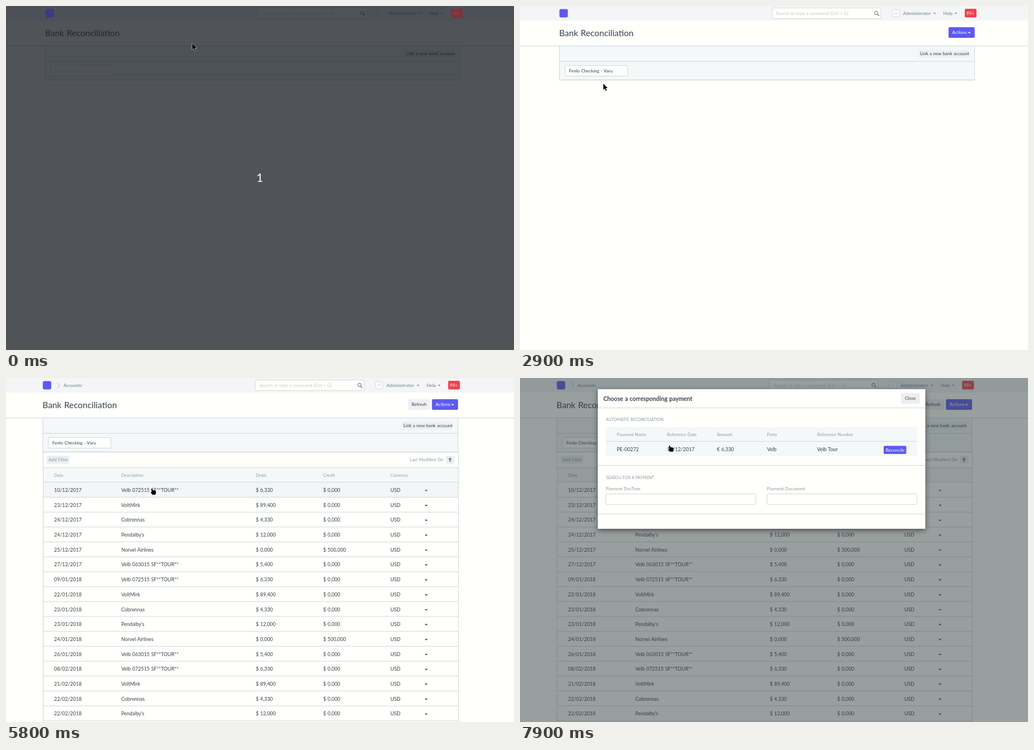
These frames come from a looping animation (908x616 px, 8000 ms). An HTML page:

```html
<!DOCTYPE html>
<html lang="en">
<head>
<meta charset="utf-8">
<title>Bank Reconciliation</title>
<style>
html, body { margin: 0; width: 100%; height: 100%; overflow: hidden; background: #fffffc; }
svg { display: block; width: 908px; height: 616px; }
text { font-family: Lato, "Noto Sans", sans-serif; word-spacing: .05em; white-space: pre; }
.shadow { filter: drop-shadow(0 2px 3px rgba(0, 0, 0, .25)); }
#modal .sheet { filter: drop-shadow(0 3px 5px rgba(0, 0, 0, .5)); }
</style>
</head>
<body>
<svg id="stage" viewBox="0 0 908 616"></svg>
<script>
const INK = '#36414c', MUTED = '#8d99a6', FAINT = '#cdd2d7', LINE = '#cfd8df';
const PAPER = '#fffffc', PANEL = '#f5f8f8', BUTTON = '#eef0f3', BLUE = '#5e5aee', RED = '#f1414e';
const LOOP = 8000, STEP = 100;

const text = (x, y, s, size = 8, fill = INK, extra = '') =>
  `<text x="${x}" y="${y}" font-size="${size}" fill="${fill}" ${extra}>${s}</text>`;
const bold = (x, y, s, size = 8, fill = MUTED) => text(x, y, s, size, fill, 'font-weight="700"');
const rect = (x, y, w, h, fill, extra = '') =>
  `<rect x="${x}" y="${y}" width="${w}" height="${h}" fill="${fill}" ${extra}/>`;
const path = (d, fill, extra = '') => `<path d="${d}" fill="${fill}" ${extra}/>`;
const line = (x, y, w, color = LINE) => rect(x, y, w, 1, color);
const side = (x, y, h) => rect(x, y, 1, h, LINE);
const field = (x, y, w, h, id = '') => rect(x, y, w, h, PAPER, `rx="2" stroke="${LINE}" ${id}`);
const caret = (x, y, fill) => path(`M${x - 2.5} ${y}h5l-2.5 2.7z`, fill);
const group = (id, body, extra = '') => `<g id="${id}" ${extra}>${body}</g>`;
const button = (x, y, w, h, label, tx, ty, fill = BUTTON, ink = INK) =>
  rect(x, y, w, h, fill, 'rx="2"') + text(tx, ty, label, 8, ink);

const ACCOUNT = 'Fenlo Checking - Varu';
const logo = rect(70.5, 5.5, 15, 15, BLUE, 'rx="3"');
const badge = rect(795, 5, 21, 15.5, RED, 'rx="2"');

const page =
  rect(0, 0, 908, 616, PAPER) + rect(0, 0, 908, 26, '#f4f5f6') + line(0, 71, 908) +
  group('shell',
    logo + field(450.5, 3.5, 194.5, 19) +
    text(457.5, 16, 'Search or type a command (Ctrl + G)', 8, '#c3c8cd') +
    '<circle cx="636.5" cy="12.3" r="3" fill="none" stroke="#55606a"/>' +
    path('M638.8 14.6l3 3', 'none', 'stroke="#55606a" stroke-width="1.3"') +
    rect(665.5, 6.5, 12.5, 13, PAPER, `rx="2" stroke="${LINE}"`) +
    text(671.8, 16, 'A', 8.5, FAINT, 'text-anchor="middle"') +
    bold(684.7, 16, 'Administrator') + caret(741, 12, MUTED) +
    bold(756.5, 16, 'Help') + caret(779, 12, MUTED) +
    badge + text(798, 16, '99+', 8, '#fff') +
    text(70, 53.7, 'Bank Reconciliation', 15.4) +
    rect(70.5, 72, 742, 60.5, PANEL) + side(70, 72, 61) + side(812, 72, 61) +
    line(70, 98.7, 743) + line(70, 132, 743, '#bfc9d1') +
    button(711.5, 78.5, 91, 14, 'Link a new bank account', 715, 88) +
    field(80.5, 106.5, 112, 19, 'id="accountBox"') +
    group('placeholder', text(88, 119, 'Bank Account', 8, FAINT)) +
    group('account', text(87.5, 118.7, ACCOUNT)) +
    group('textCaret', rect(88, 111, 1, 10.5, INK)) +
    group('actions',
      rect(766, 38, 46.7, 19, BLUE, 'rx="2" id="actionsBox"') +
      text(772.5, 50.3, 'Actions', 8, '#fff') + caret(803, 46.8, '#fff')));

const choices = group('choices',
  rect(80.5, 126, 196, 83, PAPER, `class="shadow" stroke="${LINE}"`) +
  rect(81, 126.5, 195, 27, '#f0f4f5') + text(88, 143, ACCOUNT) +
  text(88, 171, '+ Create a new Bank Account') + text(88, 198, 'Advanced Search'));

const menu = group('menu',
  rect(683.5, 59, 129, 88, PAPER, `class="shadow" stroke="${LINE}"`) +
  rect(684, 59.5, 128, 29, '#f0f4f5', 'id="menuHover"') +
  ['Upload a statement', 'Synchronize this account', 'Reconcile this account']
    .map((s, i) => text(692.5, 76.3 + 29.3 * i, s, 7.9)).join(''));

const COLUMNS = [86, 206, 446.5, 567, 687], PITCH = 26.69;
const PAYEES = [
  ['Velb 072515 SF**TOUR**', '6,330'], ['VoltMirk', '89,400'], ['Cobrennas', '4,330'],
  ["Pendalby's", '12,000'], ['Norvel Airlines', '0,000', '500,000'], ['Velb 063015 SF**TOUR**', '5,400']
];
const DATES = ('10/12/2017 23/12/2017 24/12/2017 24/12/2017 25/12/2017 27/12/2017 ' +
  '09/01/2018 22/01/2018 23/01/2018 23/01/2018 24/01/2018 26/01/2018 ' +
  '08/02/2018 21/02/2018 22/02/2018 22/02/2018').split(' ');

const rows = DATES.map((date, i) => {
  const [payee, debit, credit = '0,000'] = PAYEES[i % PAYEES.length], y = 204 + PITCH * i;
  const cells = [date, payee, '$ ' + debit, '$ ' + credit, 'USD'];
  return cells.map((s, c) => text(COLUMNS[c], y, s, 8.9)).join('') +
    caret(751, y - 3.6, INK) + line(66, y + 9, 742);
}).join('');

const crumbs = group('crumbs',
  path('M91.5 8.5l4.5 5-4.5 5', 'none', `stroke="${FAINT}" stroke-width="1.3"`) +
  bold(102.7, 16.3, 'Accounts'));

const list = group('list',
  button(72.5, 139, 40.5, 14.5, 'Add Filter', 76, 149, '#eceff1', MUTED) +
  text(721.7, 148.6, 'Last Modified On', 7.8, MUTED) +
  rect(786.5, 139, 14.5, 14.5, '#eceff1', 'rx="2"') +
  path('M793.7 142l3.5 4h-2.2v4h-2.6v-4h-2.2z', '#7f8a94') +
  rect(66, 160, 742, 27, PANEL) + line(66, 160, 742) + line(66, 186, 742) +
  ['Date', 'Description', 'Debit', 'Credit', 'Currency']
    .map((s, c) => text(COLUMNS[c], 177, s, 7.8, MUTED)).join('') +
  group('loading', side(66, 133, 462) + side(808, 133, 462) + line(66, 594, 743)) +
  group('rows', rect(66, 187, 742, 26, '#f2f6f7', 'id="rowHover"') + rows +
    side(66, 133, 483) + side(808, 133, 483) +
    button(718.5, 38, 39.5, 19, 'Refresh', 725, 50.3)));

const PAY_COLUMNS = [173, 262.7, 352, 441.5, 531];
const modal = group('modal',
  rect(139, 20, 585.5, 250, PAPER, 'class="sheet" rx="1"') +
  bold(149, 40.6, 'Choose a corresponding payment', 10.6, INK) +
  button(681, 27, 33.5, 19, 'Close', 688, 39.2, '#eceff1') + line(139, 53, 585) +
  text(153.5, 77, 'AUTOMATIC RECONCILIATION', 7.2, MUTED) +
  rect(153.5, 88, 556.5, 52, PANEL) + line(153.5, 113, 556.5) +
  ['Payment Name', 'Reference Date', 'Amount', 'Party', 'Reference Number']
    .map((s, c) => text(PAY_COLUMNS[c], 104, s, 7.8, MUTED)).join('') +
  ['PE-00272', '10/12/2017', '€ 6,330', 'Velb', 'Velb Tour']
    .map((s, c) => text(PAY_COLUMNS[c], 131, s, 8.9)).join('') +
  button(650, 121.5, 40.5, 14.5, 'Reconcile', 653.7, 131.6, BLUE, '#fff') +
  line(139, 156, 585) + text(153.5, 180.6, 'SEARCH FOR A PAYMENT', 7.2, MUTED) +
  text(153.5, 201, 'Payment DocType', 7.8, MUTED) + field(153.5, 207.5, 268, 19) +
  text(441.5, 201, 'Payment Document', 7.8, MUTED) + field(441.5, 207.5, 268, 19) +
  line(139, 243, 585));

const countdown = group('countdown',
  rect(0, 0, 908, 616, '#1a1f26', 'opacity=".76"') +
  `<g opacity=".35">${logo}${badge}</g>` +
  text(453.7, 315, '1', 21, '#fff', 'text-anchor="middle"'));

const OUTLINE = 'stroke="#fff" stroke-width="1" paint-order="stroke" stroke-linejoin="round"';
const pointer = group('pointer',
  group('arrow', path('M0 0v11l2.4-2.2 1.9 4 1.8-.8-1.9-3.9h3.4z', '#000', OUTLINE)) +
  group('beam', path('M-2.5 .5h2l.5 .5.5-.5h2M0 1v11M-2.5 12.5h2l.5-.5.5.5h2', 'none', 'stroke="#222"')) +
  group('hand', path('M-1.5 .8Q-.5-.6 .6.8L1.4 3 5.8 3.4Q7 3.8 7 5.2V8L6 11H.6L-2 7.4Q-2.4 6 -1.2 6L-.4 6.4z', '#000', OUTLINE)));

document.getElementById('stage').innerHTML = page + crumbs + list + choices + menu +
  group('backdrop', rect(0, 0, 908, 616, '#334143')) + modal + countdown + pointer;

// Pointer waypoints: time, x, y, shape kept until the next waypoint.
const WAY = [
  [0, 333, 67, 'arrow'], [100, 333, 67, 'arrow'], [200, 316, 70, 'arrow'], [700, 163, 105, 'beam'],
  [800, 163, 105, 'beam'], [900, 163, 107, 'beam'], [1000, 163, 107, 'beam'], [1100, 163, 109, 'beam'],
  [1200, 163, 109, 'beam'], [1500, 155, 86, 'arrow'], [1800, 151, 150, 'arrow'], [1900, 151, 147, 'hand'],
  [2100, 149, 139, 'hand'], [2500, 149, 139, 'arrow'], [3000, 149, 139, 'arrow'], [3600, 793, 47, 'hand'],
  [3700, 793, 47, 'hand'], [4200, 743, 133, 'hand'], [4600, 743, 133, 'arrow'], [5100, 743, 133, 'arrow'],
  [5700, 275, 194, 'hand'], [5800, 261, 198, 'hand'], [6700, 261, 198, 'arrow'], [7600, 261, 198, 'arrow'],
  [7700, 261, 181, 'arrow'], [7800, 261, 181, 'arrow'], [7900, 267.5, 121, 'hand'], [LOOP, 267.5, 121, 'hand']
];

const $ = id => document.getElementById(id);
const show = (id, on) => { $(id).style.display = on ? '' : 'none'; };
const clamp = v => Math.max(0, Math.min(1, v));

function pointerAt(t) {
  const i = WAY.findIndex(w => w[0] > t) - 1;
  const [t0, x0, y0, shape] = WAY[i], [t1, x1, y1] = WAY[i + 1], k = (t - t0) / (t1 - t0);
  return { x: x0 + (x1 - x0) * k, y: y0 + (y1 - y0) * k, shape };
}

function draw(t) {
  const within = (a, b) => t >= a && t < b;
  const { x, y, shape } = pointerAt(t);
  $('pointer').setAttribute('transform', `translate(${x} ${y})`);
  for (const s of ['arrow', 'beam', 'hand']) show(s, s === shape);

  show('countdown', t < 200);
  show('textCaret', within(1100, 2500));
  show('choices', within(1900, 2500));
  show('placeholder', t < 2500);
  show('account', t >= 2500);
  show('actions', t >= 2600);
  $('accountBox').setAttribute('stroke', within(1100, 2500) ? '#b4bdc4' : LINE);

  const menuOpen = within(3600, 4600), item = Math.floor((y - 59) / 29.3);
  show('menu', menuOpen);
  show('menuHover', item >= 0);
  $('menuHover').setAttribute('y', 59.5 + 29.3 * Math.max(0, item));
  $('actionsBox').setAttribute('fill', menuOpen ? '#2b1fe6' : BLUE);

  const listed = t >= 4600;
  $('shell').setAttribute('transform', `translate(${listed ? -4.7 : 0} 0)`);
  show('crumbs', listed);
  show('list', listed);
  show('loading', t < 5200);
  show('rows', t >= 5200);
  show('rowHover', within(5700, 6700));

  const slide = clamp((t - 6650) / 300);
  show('modal', t >= 6700);
  $('modal').setAttribute('opacity', clamp((t - 6648) / 150));
  $('modal').setAttribute('transform', `translate(0 ${-59 * (1 - slide) ** 2})`);
  $('backdrop').setAttribute('opacity', 0.5 * clamp((t - 6664) / 150));
}

function tick() {
  const t = performance.now() % LOOP;
  draw(Math.floor(t / STEP) * STEP);
  requestAnimationFrame(tick);
}
tick();
</script>
</body>
</html>
```
